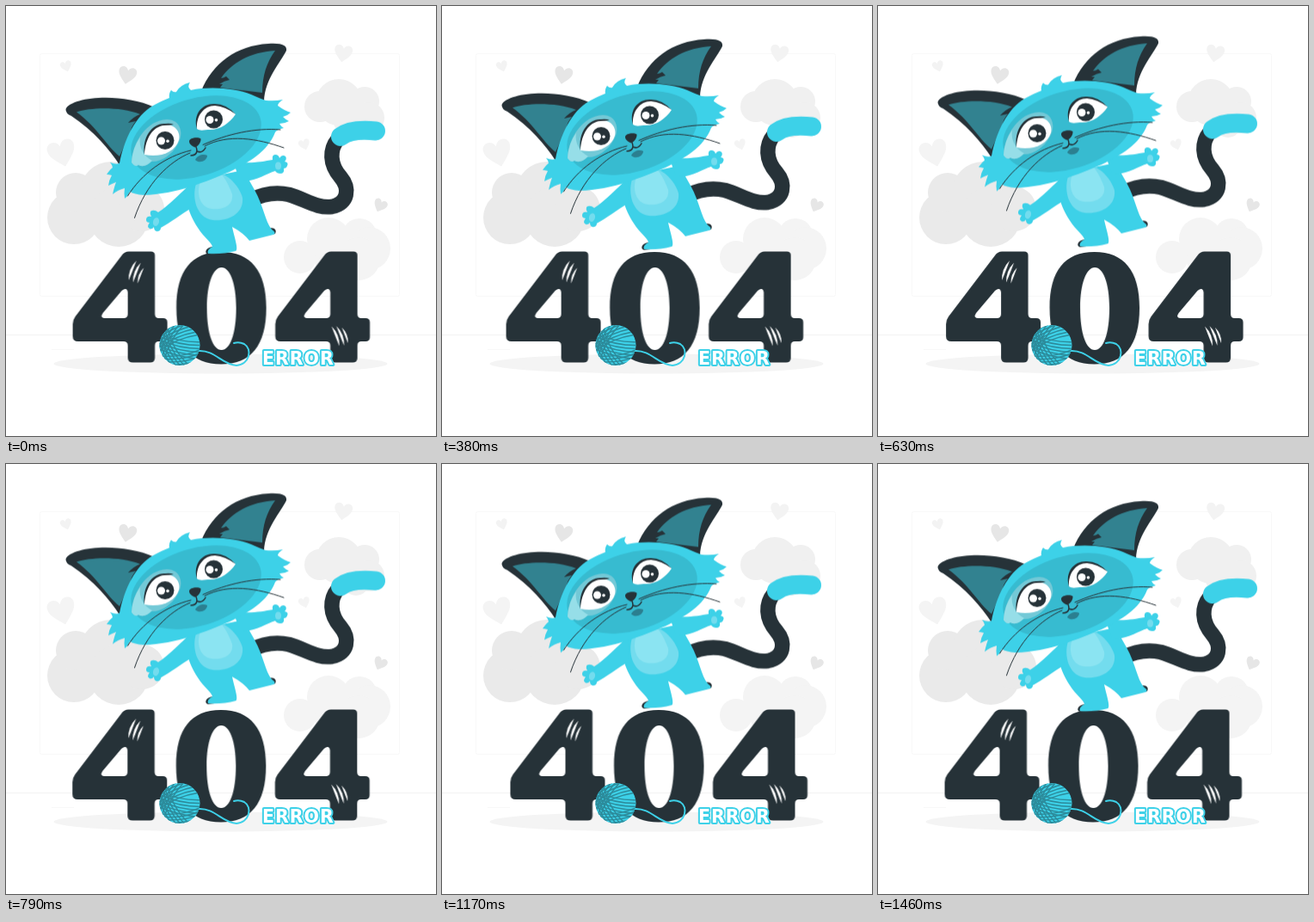
An HTML page for the animation above (1.5 s loop, 500 by 500 pixels).

```html
<!DOCTYPE html>
<html lang="en">
<head>
<meta charset="utf-8">
<title>404 error</title>
<style>
  html, body { margin: 0; width: 100%; height: 100%; overflow: hidden; background: #fff; }
  svg { display: block; width: 100vw; height: 100vh; }
  .cat { animation: float 1.5s linear infinite; }
  .digits { animation: shake 1.5s ease infinite; }
  .ink { fill: #263238; }
  .cyan { fill: #3dd1e8; }
  .teal { fill: #328290; }
  .line { fill: none; stroke: #263238; stroke-linecap: round; }
  .error {
    font: 700 20.5px "DejaVu Sans", Inter, sans-serif;
    letter-spacing: 1px;
    fill: #fff; stroke: #3dd1e8; stroke-width: 4; stroke-linejoin: round;
    paint-order: stroke;
  }
  @keyframes float {
    50% { transform: translateY(-10px); }
  }
  @keyframes shake {
    10%, 90% { transform: translateX(-1px); }
    20%, 80% { transform: translateX(2px); }
    30%, 50%, 70% { transform: translateX(-4px); }
    40%, 60% { transform: translateX(4px); }
  }
</style>
</head>
<body>
<svg viewBox="0 0 500 500">
  <defs>
    <path id="heart" d="M0 10C-5 5 -10 1 -10 -4C-10 -10 -2 -11 0 -5C2 -11 10 -10 10 -4C10 1 5 5 0 10Z"/>
    <path id="four" fill-rule="evenodd" d="M142 285.500H168Q172.500 285.500 172.500 290V358Q172.500 363 177 363H182Q187 363 187 368V385Q187 390 182 390H177Q172.500 390 172.500 395V409Q172.500 414.500 167 414.500H147Q141 414.500 141 409V395Q141 390 136 390H83Q77 390 77 384V370Q77 365 80 361L134 290Q137 285.500 142 285.500ZM134 331L112 357Q108 363 115 363H136Q141 363 141 358V333Q140 326 134 331Z"/>
    <path id="scratch" d="M4.500 -11.500Q-5 -2 -4.500 11.500Q-.5 2 4.500 -11.500Z"/>
    <clipPath id="ball"><circle cx="202" cy="394.500" r="23.500"/></clipPath>
  </defs>

  <!-- backdrop -->
  <g fill="none" stroke="#f8f8f8">
    <rect x="39.500" y="55.500" width="418" height="282" rx="2"/>
    <path d="M0 382.500H500" stroke="#f3f3f3"/>
    <path d="M53 399.500H79"/>
  </g>
  <g id="sky"></g>
  <ellipse cx="249.500" cy="416" rx="194" ry="11.500" fill="#f4f4f4"/>

  <g transform="translate(.6 0)">
    <g class="digits">
      <use href="#four" class="ink"/>
      <use href="#four" class="ink" x="235.500"/>
      <path class="ink" fill-rule="evenodd" d="M249.500 286C284 286 302 308 302 351C302 395 284 416.500 249.500 416.500C215 416.500 197.500 395 197.500 351C197.500 308 215 286 249.500 286ZM250 304C240 304 233 323 233 351C233 381 240 400 250 400C260 400 267 381 267 351C267 323 260 304 250 304Z"/>
      <g fill="#fff">
        <use href="#scratch" x="146.500" y="307.500"/>
        <use href="#scratch" x="151.500" y="310"/>
        <use href="#scratch" transform="translate(156 313.500) scale(.8)"/>
        <use href="#scratch" transform="translate(382.500 384) scale(-1 1)"/>
        <use href="#scratch" transform="translate(388 383.500) scale(-1 1)"/>
        <use href="#scratch" transform="translate(393.500 383) scale(-.8 .8)"/>
      </g>
    </g>
  </g>

  <g transform="translate(0 .8)">
    <g class="cat">
      <!-- tail -->
      <path class="line" stroke-width="17.500" d="M284 225C298 218 312 214.500 329 218.500C348 224 362 235 379 232.500C398 229 400 211 389 198C376 183 376 166 386 154"/>
      <path d="M389 151C398 144 415 143 430 144.500" fill="none" stroke="#3dd1e8" stroke-width="22" stroke-linecap="round"/>

      <!-- legs, torso, arms -->
      <path class="ink" d="M240 279C232 280 230 287 235 288L250 286ZM304 259C310 255 316 259 313 264L303 266Z"/>
      <path class="cyan" d="M213 203C206 222 212 240 223 257C230 268 239 274 240 279Q233 283 235 287Q252 288 267 284C271 283 265 266 263 256Q276 263 283 272L311 265Q315 263 309 259C301 249 300 233 289 213L276 190Z"/>
      <path class="cyan" d="M264 180C284 183 298 180 310 178Q309 172 313 172Q317 172 318 176Q321 171 325 174Q327 177 324 180Q329 181 327 185Q326 188 323 188Q324 194 319 194Q315 194 313 191C302 194 289 205 272 202Z"/>
      <path class="cyan" d="M217 204C203 216 190 231 177 239Q172 235 168 238Q167 241 169 244Q163 243 163 248Q163 251 167 251Q163 256 167 258Q170 259 172 256Q172 262 177 261Q180 260 180 257C190 252 204 241 216 234Z"/>
      <g fill="#73dcee">
        <ellipse cx="174.500" cy="250" rx="3.500" ry="5" transform="rotate(15 174 250)"/>
        <ellipse cx="316.500" cy="185" rx="3.500" ry="4.500"/>
        <path d="M221 206C216 222 221 245 240 248C259 250 277 240 275 222C271 208 257 193 244 193Q226 196 221 206Z"/>
      </g>
      <path fill="#8be4f2" d="M226 203C221 217 225 233 239 235C253 237 265 230 263 218C259 207 254 198 249 193Q231 194 226 203Z"/>

      <!-- ears -->
      <path class="ink" d="M227 98C240 66 268 45 305 43C321 42 327 45 326 51C319 65 301 84 300 110Z"/>
      <path class="teal" d="M249 94L252 90L248 90Q254 86 260 85L256 81Q253 83 250 83C263 65 283 53 313 51C303 65 298 80 298 100Z"/>
      <path class="ink" d="M69.500 119C76 105 133 99 173 117L132 184C121 167 102 144 76 127Q69 124 69.500 119Z"/>
      <path class="teal" d="M82 122.500C98 117 133 116 156 125Q148 128 142 135L151 133Q145 140 145 146L132 174C116 161 106 140 82 122.500Z"/>

      <!-- head -->
      <path class="cyan" d="M190 106Q189 101 192 97Q195 100 198 99Q202 91 214 88Q210 93 215 97C239 92 267 95 285 102Q296 107 302 109Q313 110 322 108Q316 112 316 115Q324 121 331 123Q327 127 322 128Q326 132 329 133Q324 136 318 136Q320 140 323 141Q315 143 313 146C304 169 282 181 260 192C233 203 199 218 160 219Q149 218 144 215Q142 220 138 223Q137 217 138 211Q130 213 124 218Q126 209 128 204Q123 206 119 208Q120 201 123 196Q119 195 117 195Q122 188 124 187Q123 183 121 181Q128 184 132 182C137 155 151 126 171 115Q182 109 190 106Z"/>
      <ellipse cx="221" cy="152" rx="78" ry="45" transform="rotate(-17 221 152)" fill="#37bbd0"/>
      <path fill="#73c9d7" d="M146 181C147 157 164 132 187 131C203 131 208 148 199 161C193 172 180 181 169 180Q161 188 154 184Q150 187 146 181Z"/>
      <path fill="#96dee8" d="M146 181Q147 164 156 152C154 163 160 174 170 179Q161 188 154 184Q150 187 146 181Z"/>

      <g id="eyes">
        <path fill="#fff" d="M161 172C160 155 169 138 185 137C198 137 203 147 201 155C197 169 179 176 161 172Z"/>
        <path fill="#fff" d="M222 142C220 126 229 114 242 114C252 113 261 119 267 125C260 135 250 143 237 143C231 143 226 145 222 142Z"/>
        <path class="ink" d="M161 172C158 152 170 135 185 136Q191 135 195 137Q189 138 184 138C171 139 162 153 161 172ZM222 142C217 124 229 112 243 113Q256 113 267 125Q255 116 243 115C230 115 221 127 222 142Z"/>
      </g>

      <path class="ink" d="M213 156.500C213 152.500 223 151 226.500 153.500C227 157 224 162 220 163.500C216 162 213 159.500 213 156.500Z"/>
      <path class="line" stroke-width="1.500" d="M221 163Q222 165 222 168Q221 173 215 173M222 168Q228 171 232 164"/>
      <path fill="#2b7f90" d="M220 178C223 172 230 171 234 173C234 179 225 183 220 178Z"/>
      <path class="line" d="M215 167C185 174 158 194 141.500 220M214 170C190 180 163 205 149.500 245.500M229 160.500C257 148 290 140.500 319 143M231 162C258 147.500 292 153 323 164"/>
    </g>
  </g>

  <!-- yarn -->
  <path d="M224 401C243 400 251 417 268 418C283 417 287 399 277 393Q271 390 265 392" fill="none" stroke="#3dd1e8" stroke-width="2" stroke-linecap="round"/>
  <circle cx="202" cy="394.500" r="23.500" class="cyan"/>
  <g id="yarn" clip-path="url(#ball)" fill="none" stroke="#2c8b9b" stroke-width="1.500"></g>

  <text class="error" x="298" y="417">ERROR</text>
</svg>
<script>
  const NS = "http://www.w3.org/2000/svg";
  const add = (parent, tag, attrs) => {
    const el = document.createElementNS(NS, tag);
    for (const key in attrs) el.setAttribute(key, attrs[key]);
    return document.getElementById(parent).appendChild(el);
  };
  const dot = (parent, cx, cy, r, fill) => add(parent, "circle", { cx, cy, r, fill });

  // Clouds: fill, then circles as x, y, radius
  const clouds = [
    ["#eaeaea", [79, 246, 31], [81, 217, 23], [122, 217, 36], [131, 245, 35], [158, 236, 26]],
    ["#f0f0f0", [365, 117, 18], [387, 112, 27], [417, 111, 17], [422, 130, 18], [396, 132, 16], [407, 138, 15]],
    ["#f4f4f4", [342, 292, 19], [375, 271, 25], [411, 267, 20], [422, 282, 25], [410, 294, 25], [374, 296, 15]]
  ];
  for (const [fill, ...puffs] of clouds)
    for (const [x, y, r] of puffs) dot("sky", x, y, r, fill);

  // Hearts: x, y, scale, angle, fill
  const hearts = [
    [141, 80.5, 1.05, 12, "#e6e6e6"], [70, 70, .65, -18, "#f3f3f3"],
    [392, 55, 1.05, 10, "#f3f3f3"], [65, 171, 1.6, -15, "#f4f4f4"],
    [347, 161, .65, -18, "#f4f4f4"], [435, 232, .78, 25, "#e6e6e6"]
  ];
  for (const [x, y, size, angle, fill] of hearts)
    add("sky", "use", {
      href: "#heart", fill,
      transform: `translate(${x} ${y}) rotate(${angle}) scale(${size})`
    });

  for (const [x, y] of [[185, 155.5], [241.500, 131]]) {
    dot("eyes", x, y, 10.500, "#263238");
    dot("eyes", x - 4.500, y + .5, 4.500, "#fff");
    dot("eyes", x + 3, y + .8, 1.800, "#fff");
  }

  // Bundles of thread: angle, first offset, count, bend
  const bundles = [[-25, -21, 6, -5], [12, -8, 6, 5], [62, 3, 5, 7], [-62, -18, 4, -6], [-8, 9, 4, 6]];
  for (const [angle, first, count, bend] of bundles)
    for (let i = 0; i < count; i++) {
      const y = first + i * 3.400;
      add("yarn", "path", {
        d: `M-24 ${y}Q0 ${y + bend} 24 ${y + i * .6 - 1}`,
        transform: `translate(202 394.500) rotate(${angle})`
      });
    }
</script>
</body>
</html>
```
